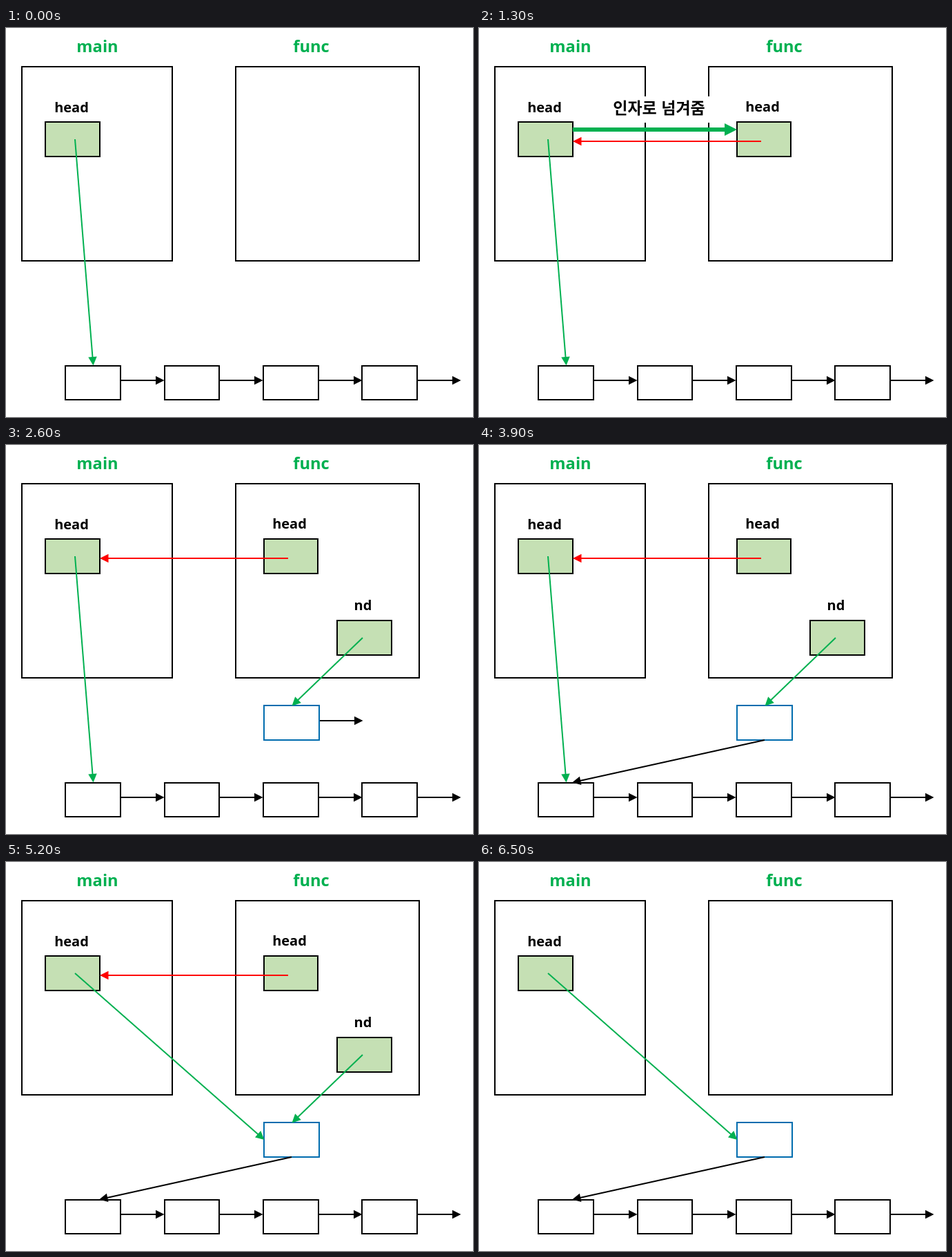
Write an HTML page that moves like this. It is 677 by 563 pixels and loops after 7.8 s.

```html
<!DOCTYPE html>
<html lang="ko">
<head>
<meta charset="utf-8">
<title>Linked list: insert at head</title>
<style>
  html, body { margin: 0; width: 100%; height: 100%; overflow: hidden; background: #fff; }
  svg { display: block; }
  text { font: 700 20px "Open Sans", "Noto Sans", sans-serif; text-anchor: middle; }
  .title { font-size: 23.7px; fill: #00b050; }
  .korean { font: 700 23px "Noto Sans CJK KR", "Noto Sans CJK", sans-serif; }
  rect { fill: #fff; stroke: #000; stroke-width: 2; }
  .variable { fill: #c5e0b4; }
  .fresh { stroke: #006cae; }
  .mask { stroke: none; }

  /* Each group is visible during part of the six 1300 ms steps. */
  .stage { animation-duration: 7800ms; animation-timing-function: step-end; animation-iteration-count: infinite; }
  #old { animation-name: old; }
  #pass { animation-name: pass; }
  #param { animation-name: param; }
  #nd { animation-name: nd; }
  #node { animation-name: node; }
  #next { animation-name: next; }
  #link { animation-name: link; }
  #moved { animation-name: moved; }
  @keyframes old { 0% { opacity: 1 } 66.666%, 100% { opacity: 0 } }
  @keyframes pass { 0% { opacity: 0 } 16.666% { opacity: 1 } 33.333%, 100% { opacity: 0 } }
  @keyframes param { 0% { opacity: 0 } 16.666% { opacity: 1 } 83.333%, 100% { opacity: 0 } }
  @keyframes nd { 0% { opacity: 0 } 33.333% { opacity: 1 } 83.333%, 100% { opacity: 0 } }
  @keyframes node { 0% { opacity: 0 } 33.333%, 100% { opacity: 1 } }
  @keyframes next { 0% { opacity: 0 } 33.333% { opacity: 1 } 50%, 100% { opacity: 0 } }
  @keyframes link { 0% { opacity: 0 } 50%, 100% { opacity: 1 } }
  @keyframes moved { 0% { opacity: 0 } 66.666%, 100% { opacity: 1 } }
</style>
</head>
<body>
<svg width="677" height="563" viewBox="0 0 677 563">
  <text class="title" x="132.5" y="35">main</text>
  <text class="title" x="442.5" y="35">func</text>
  <rect x="23" y="56" width="218" height="281"/>
  <rect x="333" y="56" width="266" height="281"/>
  <text x="95" y="122">head</text>
  <rect class="variable" x="57" y="136" width="79" height="50"/>

  <g id="list">
    <rect x="86" y="489" width="80" height="49"/>
    <rect x="230" y="489" width="79" height="49"/>
    <rect x="373" y="489" width="80" height="49"/>
    <rect x="516" y="489" width="80" height="49"/>
  </g>

  <g class="stage" id="node"><rect class="fresh" x="374" y="377" width="80" height="50"/></g>
  <g class="stage" id="param">
    <text x="411" y="121">head</text>
    <rect class="variable" x="374" y="136" width="78" height="50"/>
  </g>
  <g class="stage" id="pass">
    <rect class="mask" x="183" y="99" width="160" height="38"/>
    <text class="korean" x="261" y="124">인자로 넘겨줌</text>
  </g>
  <g class="stage" id="nd">
    <text x="517.5" y="239">nd</text>
    <rect class="variable" x="480" y="254" width="79" height="50"/>
  </g>
  <g class="stage" id="next"></g>
  <g class="stage" id="link"></g>
  <g class="stage" id="old"></g>
  <g class="stage" id="moved"></g>
</svg>
<script>
  const GREEN = '#00b050', RED = '#f00', BLACK = '#000';

  function add(parent, tag, attrs) {
    const el = document.createElementNS('http://www.w3.org/2000/svg', tag);
    for (const key in attrs) el.setAttribute(key, attrs[key]);
    parent.append(el);
  }

  // Draws a shaft with a solid triangular head whose tip is at (x2, y2).
  function arrow(id, x1, y1, x2, y2, color, width = 2, size = 12.5) {
    const parent = document.getElementById(id);
    const length = Math.hypot(x2 - x1, y2 - y1);
    const angle = Math.atan2(y2 - y1, x2 - x1) * 180 / Math.PI;
    const transform = `translate(${x1} ${y1}) rotate(${angle})`;
    const base = length - size;
    add(parent, 'path', { transform, d: `M0 0H${base + 1}`, stroke: color, 'stroke-width': width });
    add(parent, 'path', { transform, d: `M${length} 0L${base} ${-size / 2}V${size / 2}Z`, fill: color });
  }

  for (const [from, to] of [[167, 229.5], [310, 372.5], [454, 516.5], [597, 659.5]])
    arrow('list', from, 510, to, 510, BLACK);

  arrow('old', 100, 161, 126.5, 488.5, GREEN);
  arrow('moved', 100, 161, 374.5, 402, GREEN);
  arrow('pass', 136, 147, 374, 147, GREEN, 6, 18);
  arrow('param', 409, 164, 136, 164, RED);
  arrow('nd', 517, 279, 414.5, 377.5, GREEN);
  arrow('next', 455, 399, 517.5, 399, BLACK);
  arrow('link', 414, 427, 135, 488.5, BLACK);
</script>
</body>
</html>
```
